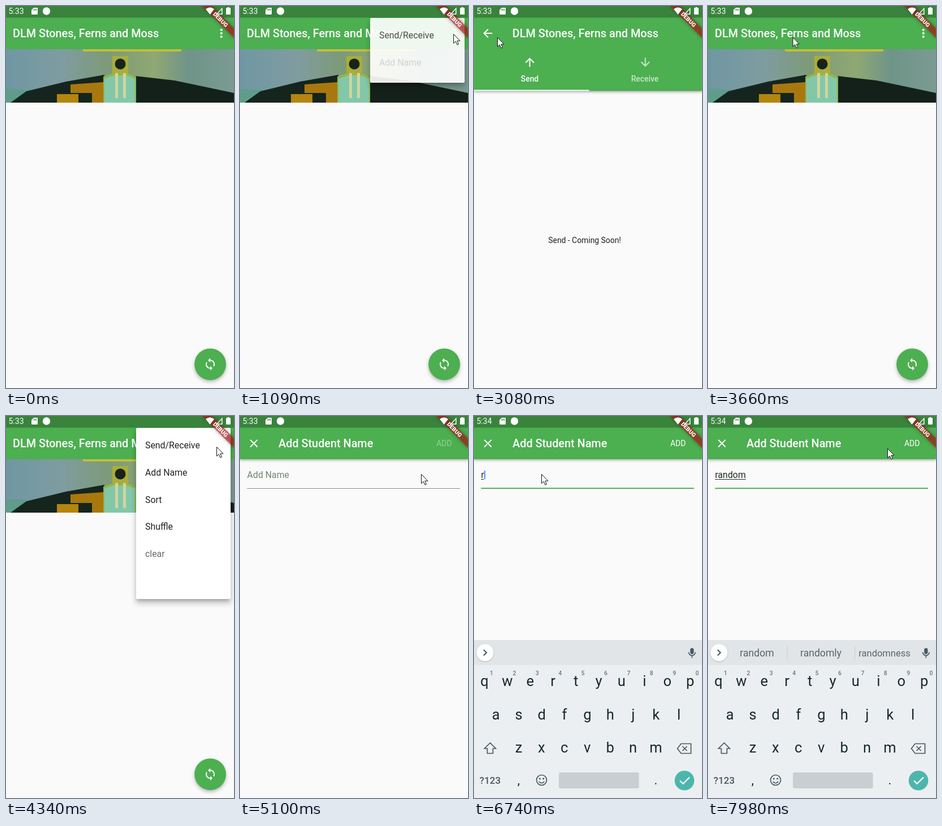
An HTML page for the animation above (8000 ms loop, 403x672 px).

```html
<!DOCTYPE html>
<html lang="en">
<head>
<meta charset="utf-8">
<title>Mobile app demo</title>
<style>
html, body { margin: 0; width: 100%; height: 100%; overflow: hidden; background: #fafafa; }
body { position: relative; font-family: Roboto, "Noto Sans", sans-serif; }
.layer, .layer > svg { position: absolute; left: 0; top: 0; width: 403px; height: 672px; }
.layer { overflow: hidden; }
svg { display: block; }
.bar { fill: #4caf50; filter: drop-shadow(0 2px 2px rgba(0,0,0,.3)); }
.title { font-size: 19.84px; font-weight: 500; fill: #fff; }
.white { fill: #fff; }
.mid { text-anchor: middle; }

/* popup menu */
#menu {
  position: absolute; right: calc(100% - 397px); top: 20.5px; width: 0; height: 0;
  overflow: hidden; opacity: 0; background: #fff; border-radius: 2px;
  box-shadow: 0 5px 5px -3px rgba(0,0,0,.2), 0 8px 10px 1px rgba(0,0,0,.14), 0 3px 10px 2px rgba(0,0,0,.1);
  animation: menu 8s linear infinite;
}
#menu div {
  position: absolute; right: 0; width: 151px; top: calc(7.9px + var(--i) * 47.6px);
  line-height: 47.6px; font-size: 15.87px; color: rgba(0,0,0,.87); white-space: nowrap;
  animation: item 8s linear calc(-8s + var(--i) * 40ms) infinite;
}
@keyframes menu {
  0%, 12.5% { width: 0; height: 0; opacity: 0; }
  13% { width: 167px; }
  13.75% { opacity: 1; }
  15.5%, 19.75% { height: 301.5px; }
  20.9% { opacity: 1; }
  21.25% { width: 167px; }
  21.75%, 51.25% { width: 0; height: 0; opacity: 0; }
  51.75% { width: 167px; }
  52.5% { opacity: 1; }
  54.25%, 61.25% { height: 301.5px; }
  62.4% { opacity: 1; }
  62.75% { width: 167px; }
  63.25%, 100% { width: 0; height: 0; opacity: 0; }
}
@keyframes item {
  0%, 13% { opacity: 0; }
  13.75%, 22.5% { opacity: 1; }
  22.6%, 51.75% { opacity: 0; }
  52.5%, 64% { opacity: 1; }
  64.1%, 100% { opacity: 0; }
}

/* pages rise and fade in */
#tabs { background: #fafafa; animation: tabsFade 8s infinite, tabsRise 8s infinite; }
#form { background: #fafafa; animation: formFade 8s infinite, formRise 8s infinite; }
@keyframes tabsFade {
  0%, 18% { opacity: 0; animation-timing-function: ease-in; }
  21.75%, 40.75% { opacity: 1; animation-timing-function: ease-out; }
  44.5%, 100% { opacity: 0; }
}
@keyframes tabsRise {
  0%, 18% { transform: translateY(168px); animation-timing-function: cubic-bezier(.4,0,.2,1); }
  21.75%, 40.75% { transform: none; animation-timing-function: cubic-bezier(.8,0,.6,1); }
  44.5%, 100% { transform: translateY(168px); }
}
@keyframes formFade {
  0%, 59.5% { opacity: 0; animation-timing-function: ease-in; }
  63.25%, 100% { opacity: 1; }
}
@keyframes formRise {
  0%, 59.5% { transform: translateY(168px); animation-timing-function: cubic-bezier(.4,0,.2,1); }
  63.25%, 100% { transform: none; }
}

/* tab switch */
.tab { font-size: 13.9px; font-weight: 500; fill: #fff; text-anchor: middle; }
.note { font-size: 13.9px; fill: rgba(0,0,0,.87); text-anchor: middle; }
#marker { --to: 204px; animation: swipe 8s ease infinite; }
#notes { --to: -408px; animation: swipe 8s ease infinite; }
#send { --on: 1; --off: .7; animation: tint 8s ease infinite; }
#receive { --on: .7; --off: 1; animation: tint 8s ease infinite; }
@keyframes swipe {
  0%, 28.625%, 39.05%, 100% { transform: translateX(0); }
  32.375%, 35.3% { transform: translateX(var(--to)); }
}
@keyframes tint {
  0%, 28.625%, 39.05%, 100% { opacity: var(--on); }
  32.375%, 35.3% { opacity: var(--off); }
}

/* form field */
#hint { font-size: 15.87px; fill: #6f876f; animation: untilTyped 8s step-end infinite; }
#add { font-size: 13.9px; fill: #fff; animation: enable 8s step-end infinite; }
#typed { position: absolute; left: 12.4px; top: 94px; line-height: 20px; font-size: 15.87px; color: #1f2a20; }
#typed span {
  text-decoration: underline 1px; text-underline-offset: 1.5px;
  animation: typed 8s step-end calc(-8s + var(--i) * 98ms) infinite;
}
#caret { fill: #4285f4; animation: caretShow 8s step-end infinite, caretMove 8s step-end infinite; }
#focus { animation: focus 8s ease-out infinite; }
#words { animation: words 8s step-end infinite; }
#keys { animation: keysUp 8s cubic-bezier(0,0,.2,1) infinite; }
@keyframes untilTyped { 0% { opacity: 1; } 84.25%, 100% { opacity: 0; } }
@keyframes enable { 0% { opacity: .42; } 84.25%, 100% { opacity: 1; } }
@keyframes typed { 0% { visibility: hidden; } 84.25%, 100% { visibility: visible; } }
@keyframes words { 0% { opacity: 0; } 87.9%, 100% { opacity: 1; } }
@keyframes caretShow { 0% { opacity: 0; } 75% { opacity: 1; } 97.5%, 100% { opacity: 0; } }
@keyframes caretMove {
  0% { transform: none; }
  84.25% { transform: translateX(5.4px); }
  85.475% { transform: translateX(14px); }
  86.7% { transform: translateX(22.8px); }
  87.925% { transform: translateX(31.8px); }
  89.15% { transform: translateX(40.9px); }
  90.375%, 100% { transform: translateX(54px); }
}
@keyframes focus { 0%, 76.375% { opacity: 0; } 79%, 100% { opacity: 1; } }
@keyframes keysUp {
  0%, 76.375% { transform: translateY(280px); }
  79.75%, 100% { transform: none; }
}

/* keyboard */
.key { font-size: 25.5px; fill: #16282f; text-anchor: middle; }
.num { font-size: 10.5px; font-weight: 500; fill: #6b767b; text-anchor: middle; }
.word { font-size: 17.6px; fill: #5a6469; text-anchor: middle; }

/* status clock and pointer */
#old { animation: old 8s step-end infinite; }
#new { animation: new 8s step-end infinite; }
@keyframes old { 0% { opacity: 1; } 70.75%, 100% { opacity: 0; } }
@keyframes new { 0% { opacity: 0; } 70.75%, 100% { opacity: 1; } }
#pointer {
  position: absolute; left: 0; top: 0; width: 14px; height: 21px; overflow: visible;
  animation: move 8s ease-in-out infinite, appear 8s step-end infinite;
}
@keyframes appear { 0% { opacity: 0; } .5%, 100% { opacity: 1; } }
@keyframes move {
  0%, .5% { transform: translate(396px, 360px); }
  2.125%, 6.625% { transform: translate(374px, 245px); }
  11.25%, 19.5% { transform: translate(377px, 49px); }
  24.875% { transform: translate(222px, 94px); }
  27.875%, 31% { transform: translate(296px, 112px); }
  34.75%, 35.5% { transform: translate(118px, 112px); }
  38.5% { transform: translate(41px, 55px); }
  40.25%, 41.5% { transform: translate(26px, 50px); animation-timing-function: ease-in; }
  48.25% { transform: translate(290px, 60px); animation-timing-function: ease-out; }
  50.625%, 55.25% { transform: translate(372px, 54px); }
  58.25%, 62.5% { transform: translate(330px, 102px); animation-timing-function: ease-in; }
  69.5% { transform: translate(135px, 101px); animation-timing-function: ease-out; }
  71.75%, 96.5% { transform: translate(119px, 102px); }
  99.5%, 100% { transform: translate(317px, 57px); }
}
</style>
</head>
<body>

<div class="layer" id="home">
  <svg viewBox="0 0 403 672">
    <defs>
      <linearGradient id="sky">
        <stop offset="0" stop-color="#6f97a3"/>
        <stop offset=".25" stop-color="#7f9ca0"/>
        <stop offset=".45" stop-color="#7d9a78"/>
        <stop offset=".65" stop-color="#8fa873"/>
        <stop offset=".8" stop-color="#6f9488"/>
        <stop offset="1" stop-color="#7b9b92"/>
      </linearGradient>
      <clipPath id="photo"><path d="M0 76h403v94H0z"/></clipPath>
    </defs>
    <path class="bar" d="M0 0h403v76H0z"/>
    <g clip-path="url(#photo)">
      <path fill="url(#sky)" d="M0 76h403v94H0z"/>
      <path fill="#c3bd3c" d="M136 76h174v4H136z"/>
      <path fill="#5f9c8c" d="M0 146l50 2-30 22H0z"/>
      <path fill="#15251d" d="M8 170l28-20 70-17 68-12v49z"/>
      <path fill="#14211a" d="M228 123l70 8 105 22v17H228z"/>
      <path fill="#a8780f" d="M114 138l58-4v36h-20v-17h-38z"/>
      <path fill="#b3860f" d="M90 155h38v15H90z"/>
      <path fill="#8fb54e" d="M172 124l18-6h24l16 6v46h-58z"/>
      <path fill="#83c7a9" d="M174 128l16-6h24l14 6v42h-54z"/>
      <path fill="#a9ad3a" d="M188 88h28v34h-28z"/>
      <path fill="#cfd6a0" d="M193 118h5v44h-5zM207 118h5v44h-5z"/>
      <circle cx="202" cy="102" r="9.5" fill="#18231a"/>
    </g>
    <text class="title" x="12" y="55.3">DLM Stones, Ferns and Moss</text>
    <g class="white"><circle cx="380.7" cy="42" r="2.1"/><circle cx="380.7" cy="48" r="2.1"/><circle cx="380.7" cy="54" r="2.1"/></g>
    <circle cx="361" cy="630.3" r="27.9" fill="#4caf50" style="filter:drop-shadow(0 3px 3px rgba(0,0,0,.28))"/>
    <path class="white" transform="translate(349 618.3)" d="M12 4V1L8 5l4 4V6c3.31 0 6 2.69 6 6 0 1.01-.25 1.97-.7 2.8l1.46 1.46C19.54 15.03 20 13.57 20 12c0-4.42-3.58-8-8-8zm0 14c-3.31 0-6-2.69-6-6 0-1.01.25-1.97.7-2.8L5.24 7.74C4.46 8.97 4 10.43 4 12c0 4.42 3.58 8 8 8v3l4-4-4-4v3z"/>
  </svg>
</div>

<div class="layer" id="popup">
  <div id="menu">
    <div style="--i:0">Send/Receive</div>
    <div style="--i:1">Add Name</div>
    <div style="--i:2">Sort</div>
    <div style="--i:3">Shuffle</div>
    <div style="--i:4">clear</div>
  </div>
</div>

<div class="layer" id="tabs">
  <svg viewBox="0 0 403 672">
    <path class="bar" d="M0 0h403v149.5H0z"/>
    <path class="white" transform="translate(12.3 36)" d="M20 11H7.83l5.59-5.59L12 4l-8 8 8 8 1.41-1.41L7.83 13H20v-2z"/>
    <text class="title" x="67.7" y="55.3">DLM Stones, Ferns and Moss</text>
    <g id="send">
      <path class="white" transform="translate(86.5 87)" d="M4 12l1.41 1.41L11 7.83V20h2V7.83l5.58 5.59L20 12l-8-8-8 8z"/>
      <text class="tab" x="98.5" y="133.3">Send</text>
    </g>
    <g id="receive">
      <path class="white" transform="translate(290.7 87)" d="M20 12l-1.41-1.41L13 16.17V4h-2v12.17l-5.58-5.59L4 12l8 8 8-8z"/>
      <text class="tab" x="302" y="133.3">Receive</text>
    </g>
    <path id="marker" class="white" d="M-3 147.5h204v2H-3z"/>
    <g id="notes">
      <text class="note" x="200.5" y="416.5">Send - Coming Soon!</text>
      <text class="note" x="608.5" y="416.5">Receive - Coming Soon!</text>
    </g>
  </svg>
</div>

<div class="layer" id="form">
  <svg viewBox="0 0 403 672">
    <path class="bar" d="M0 0h403v76H0z"/>
    <path class="white" transform="translate(12.5 36.2)" d="M19 6.41L17.59 5 12 10.59 6.41 5 5 6.41 10.59 12 5 17.59 6.41 19 12 13.41 17.59 19 19 17.59 13.41 12z"/>
    <text class="title" x="68" y="55.3">Add Student Name</text>
    <text id="add" x="347" y="53.3">ADD</text>
    <text id="hint" x="12.6" y="109.3">Add Name</text>
    <path fill="#8d8d8d" d="M12.5 127H389v1H12.5z"/>
    <path id="focus" fill="#4caf50" d="M12.5 126.3H389v2H12.5z"/>
    <path id="caret" d="M12.5 96h2v15h-2z"/>
  </svg>
  <div id="typed"><span style="--i:0">r</span><span style="--i:1">a</span><span style="--i:2">n</span><span style="--i:3">d</span><span style="--i:4">o</span><span style="--i:5">m</span></div>
  <svg viewBox="0 0 403 672">
    <g id="keys">
      <path fill="#eceff1" d="M0 394h403v278H0z"/>
      <path fill="#e1e5e8" d="M0 394h403v44H0z"/>
      <circle cx="19.5" cy="416.3" r="15" fill="#fff" style="filter:drop-shadow(0 1px 1px rgba(0,0,0,.2))"/>
      <path d="M17 411.3l5 5-5 5" fill="none" stroke="#455a64" stroke-width="2"/>
      <g id="words">
        <path d="M140 404v24M259.5 404v24" stroke="#c6cbce"/>
        <text class="word" x="86.5" y="422.7">random</text>
        <text class="word" x="199.5" y="422.7">randomly</text>
        <text class="word" x="312" y="422.7" style="font-size:16.5px">randomness</text>
      </g>
      <g fill="none" stroke="#455a64" stroke-width="1.7">
        <rect x="383" y="409" width="4.6" height="9" rx="2.3" fill="#455a64"/>
        <path d="M379.5 415.5a5.8 5.8 0 0 0 11.6 0M385.3 421.5v4"/>
        <path d="M28.5 575l-10 10h5v8.500h10V585h5z" stroke="#4a565c"/>
        <path d="M366 576.500h17.500v17H366l-6.500-8.500zM368.500 581l8 8m0-8l-8 8" stroke="#4a565c"/>
        <circle cx="119.500" cy="640.500" r="9"/>
        <path d="M114.500 643q5 5.500 10 0"/>
      </g>
      <circle cx="116.300" cy="638" r="1.500" fill="#455a64"/><circle cx="122.700" cy="638" r="1.500" fill="#455a64"/>
      <text class="mid" x="28.500" y="647" font-size="17" font-weight="500" fill="#4a565c">?123</text>
      <text class="key" x="79" y="648" style="font-size:22px">,</text>
      <text class="key" x="321.500" y="648" style="font-size:22px">.</text>
      <rect x="150" y="627" width="141.500" height="28" rx="3" fill="#c9ced2"/>
      <circle cx="372" cy="641.300" r="17.300" fill="#4db6ac"/>
      <path d="M364 641.500l5.500 5.500L381 635.500" fill="none" stroke="#fff" stroke-width="2.200"/>
    </g>
  </svg>
</div>

<div class="layer" id="system">
  <svg viewBox="0 0 403 672">
    <path d="M0 0h403v20.500H0z" fill="#39833c"/>
    <g transform="translate(403 0) rotate(45)">
      <path d="M-40 27.800h80v11.900h-80z" fill="#b71c1c" fill-opacity=".627" style="filter:drop-shadow(0 0 3px rgba(0,0,0,.5))"/>
      <text class="mid white" y="37.300" font-size="10.100" font-weight="900">DEBUG</text>
    </g>
    <g class="white">
      <g font-size="14"><text id="old" x="4.500" y="14">5:33</text><text id="new" x="4.500" y="14">5:34</text></g>
      <path fill-rule="evenodd" d="M49 3h6q1 0 1 1v10q0 1-1 1h-9q-1 0-1-1V7zM48.500 5v3h1.200V5zM50.800 5v3H52V5zM53 5v3h1.200V5z"/>
      <circle cx="71.500" cy="9" r="6.700"/>
      <path d="M353 5.500q7.500-6 15 0L360.500 15z"/>
      <path fill-rule="evenodd" d="M382.500 2.500V15H371zM381 6l-6.500 7.500h6.500z"/>
      <path d="M391.500 2h3v1.300h2q.500 0 .5.700v10q0 1-1 1h-6q-1 0-1-1V4q0-.7.700-.7h1.800z"/>
    </g>
  </svg>
  <svg id="pointer" viewBox="0 0 14 21" style="width:14px;height:21px">
    <path d="M.5.500v16.200l3.700-3.500 2.700 6 2.500-1.100-2.600-5.900h5.100z" fill="#fff" stroke="#111"/>
  </svg>
</div>

<script>
const keys = document.getElementById("keys");

function label(cls, x, y, text) {
  const el = document.createElementNS("http://www.w3.org/2000/svg", "text");
  el.setAttribute("class", cls);
  el.setAttribute("x", x);
  el.setAttribute("y", y);
  el.textContent = text;
  keys.append(el);
}

const rows = [["qwertyuiop", 18.5], ["asdfghjkl", 38.8], ["zxcvbnm", 79]];
rows.forEach(([letters, left], row) =>
  [...letters].forEach((ch, i) => {
    const x = left + i * 40.4;
    label("key", x, 475.3 + row * 58.4, ch);
    if (row === 0) label("num", x + 12.5, 456, (i + 1) % 10);
  }));
</script>
</body>
</html>
```
